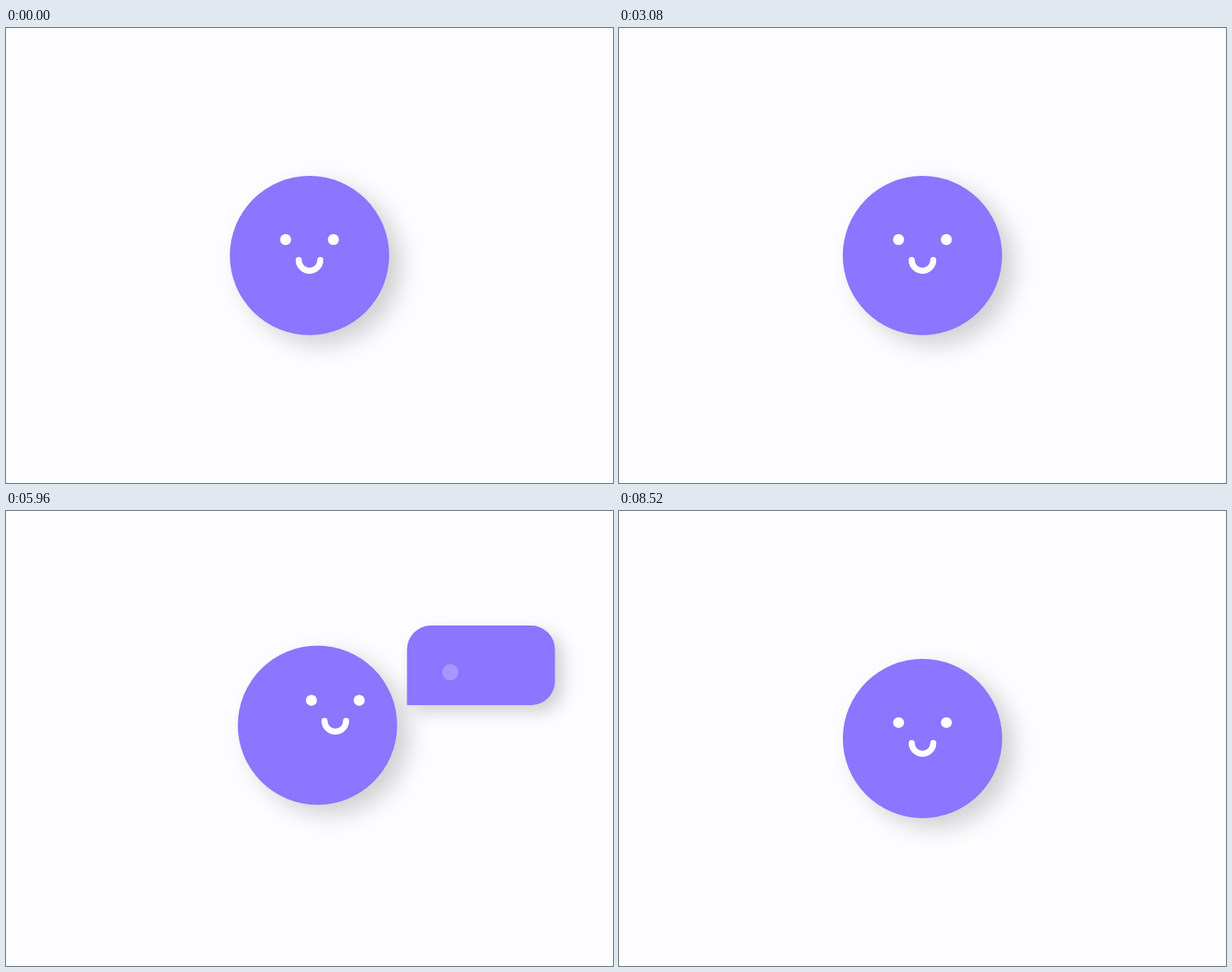
Write an HTML page with a canvas that moves like this. It is 800x600 px and loops after 8.56 s.

```html
<!DOCTYPE html>
<html lang="en">
<head>
<meta charset="utf-8">
<title>Chatting face</title>
<style>
  html, body { margin: 0; width: 100%; height: 100%; overflow: hidden; background: #fdfdff; }
  canvas { display: block; width: 800px; height: 600px; }
</style>
</head>
<body>
<canvas id="stage" width="800" height="600"></canvas>
<script>
const ctx = document.getElementById('stage').getContext('2d');
const LOOP = 8560;
const PURPLE = '#8c75ff';
const OVERSHOOT = 1.35;

const clamp = v => Math.min(1, Math.max(0, v));
const progress = (t, start, duration) => clamp((t - start) / duration);
const expoOut = p => p >= 1 ? 1 : 1 - 2 ** (-10 * p);
const quartOut = p => 1 - (1 - p) ** 4;
const quadOut = p => p * (2 - p);
const backIn = p => p * p * ((OVERSHOOT + 1) * p - OVERSHOOT);
const backOut = p => 1 - backIn(1 - p);

// start, head duration, face duration, head offset, face offset
const poses = [
  [225, 950, 600, [10.5, 0], [35.5, 0]],
  [1465, 950, 600, [-10.5, 0], [-35.5, 0]],
  [2742, 500, 355, [0, 0], [0, 0]],
  [3875, 950, 600, [10.5, -17.5], [34, -29.3]],
  [7581, 500, 355, [0, 0], [0, 0]]
];
const blinks = [4340, 5960, 8340];

// start, from y, to y, from opacity, to opacity
const dotMoves = [
  [4372, 30, 0, 0, 1],
  [5161, 0, -30, 1, 0],
  [5910, 30, 0, 0, 1],
  [6681, 0, -30, 1, 0]
];
const DOT_STAGGER = 133;
const DOT_TIME = 200;

function offsetAt(t, durationIndex, offsetIndex) {
  let x = 0, y = 0;
  for (const pose of poses) {
    const p = expoOut(progress(t, pose[0], pose[durationIndex]));
    const [toX, toY] = pose[offsetIndex];
    x += (toX - x) * p;
    y += (toY - y) * p;
  }
  return [x, y];
}

function eyeScale(t) {
  const start = blinks.find(b => t >= b && t < b + 200);
  if (start === undefined) return 1;
  const p = (t - start) / 100;
  return Math.max(0.05, p < 1 ? 1 - quadOut(p) : quadOut(p - 1));
}

function setShadow(x, y, blur) {
  ctx.shadowColor = 'rgba(0, 0, 0, 0.18)';
  ctx.shadowOffsetX = x;
  ctx.shadowOffsetY = y;
  ctx.shadowBlur = blur;
}

function fillEllipse(x, y, rx, ry, color) {
  ctx.fillStyle = color;
  ctx.beginPath();
  ctx.ellipse(x, y, rx, ry, 0, 0, Math.PI * 2);
  ctx.fill();
}

function drawFace(t) {
  const [headX, headY] = offsetAt(t, 1, 3);
  const [faceX, faceY] = offsetAt(t, 2, 4);
  ctx.save();
  setShadow(15.5, 12.5, 30);
  fillEllipse(400 + headX, 300 + headY, 105, 105, PURPLE);
  ctx.restore();

  const ry = 7.3 * eyeScale(t);
  for (const side of [-1, 1]) {
    fillEllipse(400 + faceX + side * 31.5, 279 + faceY, 7.3, ry, '#fff');
  }
  ctx.strokeStyle = '#fff';
  ctx.lineWidth = 8;
  ctx.lineCap = 'round';
  ctx.beginPath();
  ctx.arc(400 + faceX, 306 + faceY, 14.2, 0, Math.PI);
  ctx.stroke();
}

function drawBubble(t) {
  const scale = backOut(progress(t, 4169, 450)) - backIn(progress(t, 7172, 450));
  if (scale <= 0.001) return;
  const w = 195 * scale, h = 105 * scale, r = 31.5 * scale;
  ctx.save();
  setShadow(10, 9, 22);
  ctx.fillStyle = PURPLE;
  ctx.beginPath();
  ctx.roundRect(528.5, 256 - h, w, h, [r, r, r, 0]);
  ctx.fill();
  ctx.restore();
}

function drawDots(t) {
  for (let i = 0; i < 3; i++) {
    const local = t - i * DOT_STAGGER;
    const move = dotMoves.filter(m => local >= m[0]).pop();
    if (!move) continue;
    const [start, fromY, toY, fromAlpha, toAlpha] = move;
    const p = progress(local, start, DOT_TIME);
    ctx.globalAlpha = fromAlpha + (toAlpha - fromAlpha) * p;
    const y = 203.2 + fromY + (toY - fromY) * quartOut(p);
    fillEllipse(585.6 + i * 42.2, y, 10.6, 10.6, '#fff');
  }
  ctx.globalAlpha = 1;
}

function draw(now) {
  const t = now % LOOP;
  ctx.fillStyle = '#fdfdff';
  ctx.fillRect(0, 0, 800, 600);
  drawFace(t);
  drawBubble(t);
  drawDots(t);
}

let origin;
function tick(now) {
  origin ??= now;
  draw(now - origin);
  requestAnimationFrame(tick);
}
draw(0);
requestAnimationFrame(tick);
</script>
</body>
</html>
```
